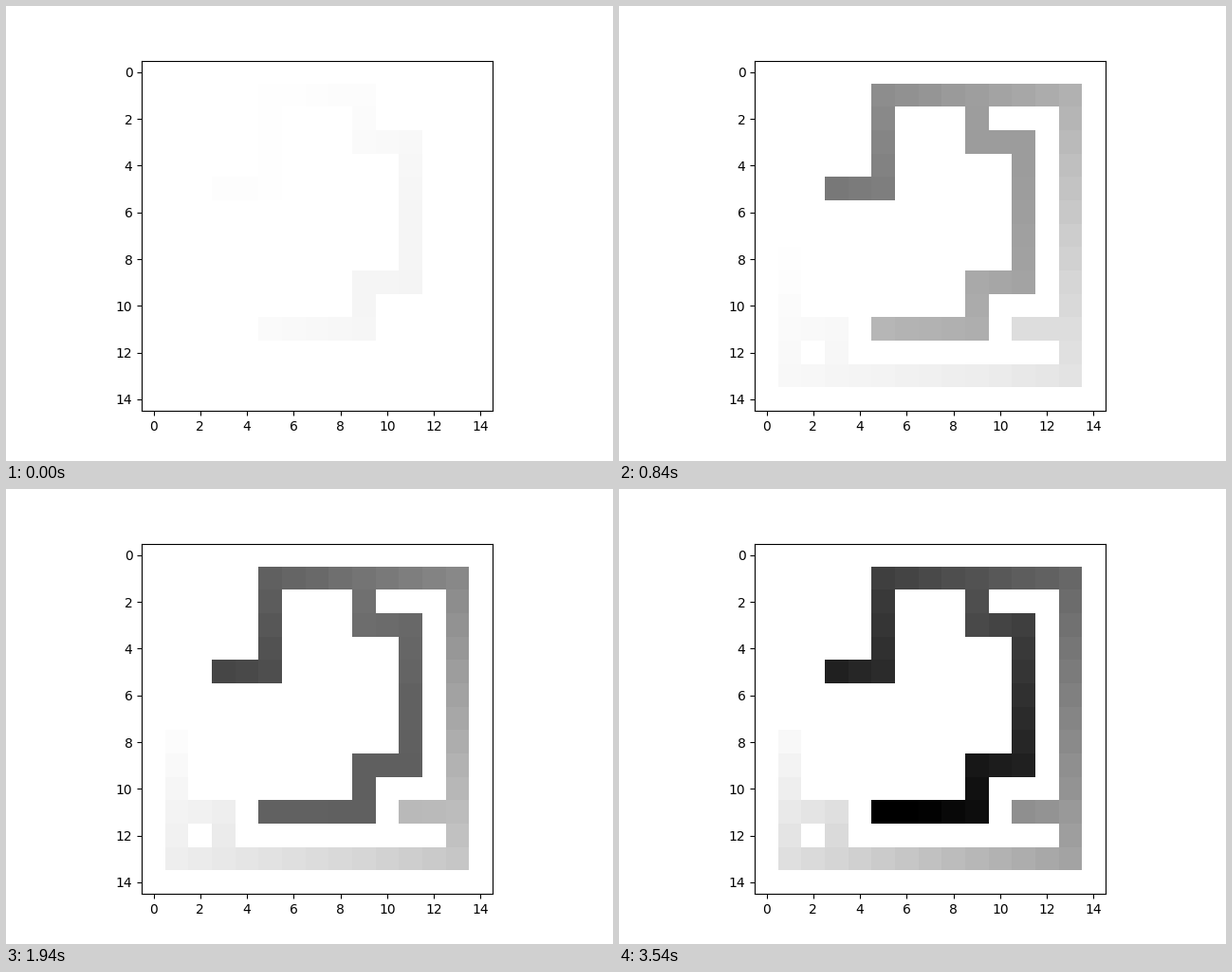
Write a matplotlib script that moves like this. It is 640 px wide and 480 px high and loops after 4 s.

```python
import numpy as np
import matplotlib.pyplot as plt
from matplotlib.animation import FuncAnimation

SIZE = 15
STEP_MS = 20
LOOP_MS = 4000
SETTLED_MS = 3540
START_VALUE = 222
VALUE_STEP = 5

# Corners (row, col), steps from the start cell, final darkness of the first
# cell, change per cell, and whether the corridor is faintly dark at the outset.
CORRIDORS = [
    ([(5, 3), (5, 5), (1, 5), (1, 9)], 0, START_VALUE, -VALUE_STEP, True),
    ([(2, 9), (3, 9), (3, 11), (9, 11), (9, 9), (11, 9), (11, 5)],
     11, START_VALUE - 9 * VALUE_STEP, VALUE_STEP, True),
    ([(1, 10), (1, 13), (13, 13), (13, 1), (8, 1)],
     11, START_VALUE - 11 * VALUE_STEP, -VALUE_STEP, False),
    ([(11, 12), (11, 11)],
     25, START_VALUE - 23 * VALUE_STEP, VALUE_STEP, False),
    ([(12, 3), (11, 3), (11, 2)],
     37, START_VALUE - 37 * VALUE_STEP, -VALUE_STEP, False),
]


def trace(corners):
    """List every cell on the straight runs between corners."""
    cells = [corners[0]]
    for end in corners[1:]:
        while cells[-1] != end:
            row, col = cells[-1]
            cells.append((row + int(np.sign(end[0] - row)),
                          col + int(np.sign(end[1] - col))))
    return cells


distance = np.zeros((SIZE, SIZE))
final = np.zeros((SIZE, SIZE))
faint = np.zeros((SIZE, SIZE))

for corners, steps, value, change, walked in CORRIDORS:
    for i, cell in enumerate(trace(corners)):
        distance[cell] = steps + i
        final[cell] = value + change * i
        if walked:
            faint[cell] = 6 + 5 * np.cos((steps + i - 20) / 5)

# Cells near the start darken early; far ones grow almost evenly.
bend = 30 * np.exp(-(distance / 14) ** 2)


def grid_at(ms):
    progress = min(ms / SETTLED_MS, 1)
    growth = np.log1p(bend * progress) / np.log1p(bend)
    return np.clip(np.maximum(final * growth, faint), 0, 255)


fig, ax = plt.subplots(figsize=(6.4, 4.8), dpi=100)
image = ax.imshow(grid_at(0), cmap="gray_r", vmin=0, vmax=255,
                  interpolation="nearest")
ax.set_xticks(range(0, SIZE, 2))
ax.set_yticks(range(0, SIZE, 2))


def update(frame):
    image.set_data(grid_at(frame * STEP_MS))
    return [image]


anim = FuncAnimation(fig, update, frames=LOOP_MS // STEP_MS,
                     interval=STEP_MS, repeat=True, repeat_delay=0)
plt.show()
```
